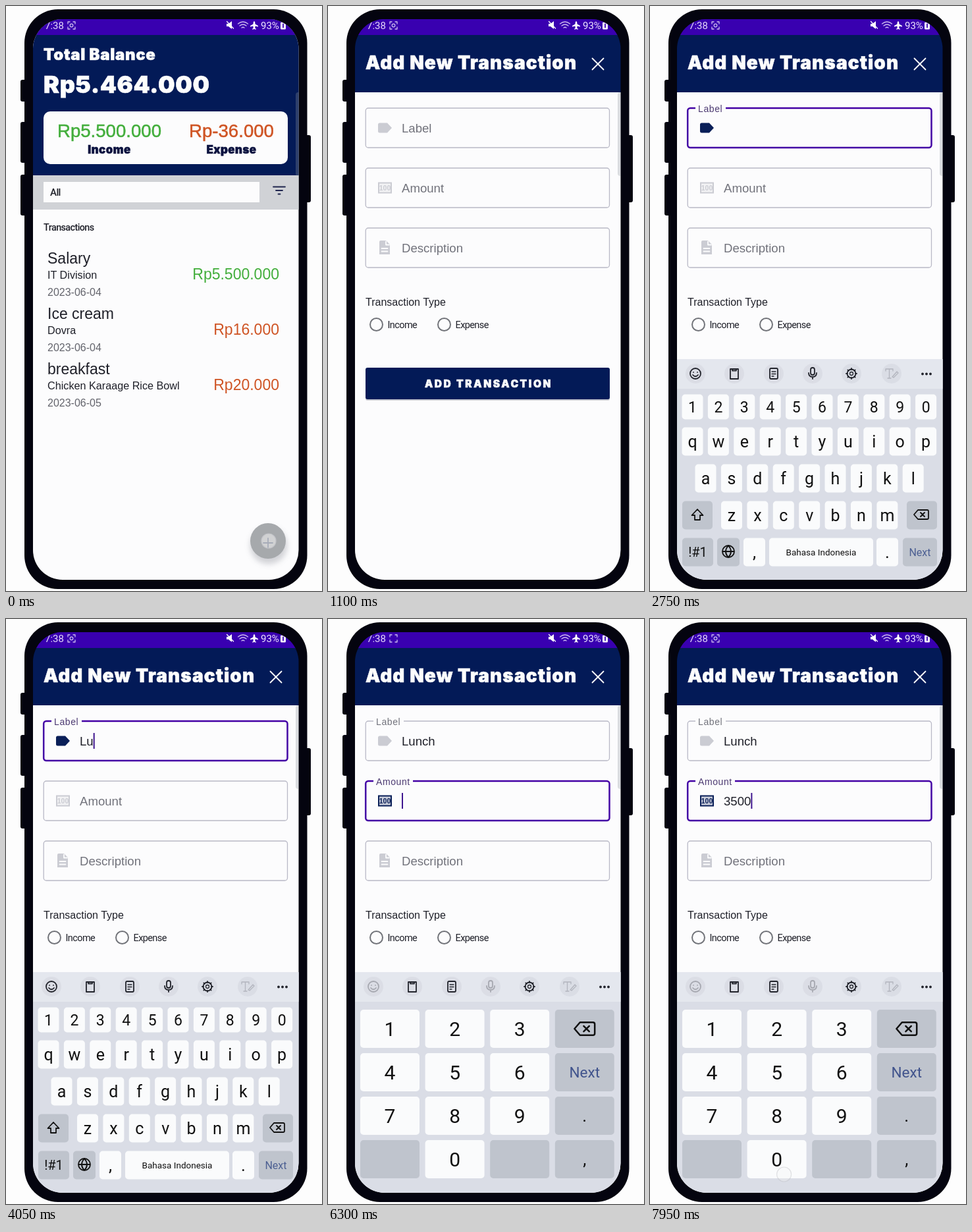
An HTML page that plays this animation: 480x888 px, repeating every 8000 ms.

```html
<!DOCTYPE html>
<html lang="en">
<head>
<meta charset="utf-8">
<title>Expense tracker</title>
<style>
html, body { margin: 0; width: 100%; height: 100%; overflow: hidden; background: #fdfdfd; }
svg { display: block; width: 100%; height: 100%; }
text { font-family: "Liberation Sans", Arial, sans-serif; white-space: pre; }
.heavy { font-family: Inter, sans-serif; font-weight: 900; stroke: currentColor; stroke-width: .6px; letter-spacing: .03em; }
.slim { font-family: Roboto, sans-serif; letter-spacing: -.6px; }
.key { font-family: Roboto, sans-serif; text-anchor: middle; }
.end { text-anchor: end; }
.mid { text-anchor: middle; }
.line { fill: none; stroke: currentColor; stroke-width: 1.8; stroke-linecap: round; stroke-linejoin: round; }
.thin { stroke-width: 1.3; }
</style>
</head>
<body>
<svg id="stage" viewBox="0 0 480 888" xmlns="http://www.w3.org/2000/svg"></svg>
<script>
const LOOP = 8000;
const PAGE = '#fcfcfd', NAVY = '#031a57', PURPLE = '#3900b0', INK = '#1f2029', BODY = '#04040f';
const EDGE = '#b9b9c6', PALE = '#cbccd3', DIM = '#71727b', WHITE = '#fdfdfd';
const GREEN = '#43ae3c', RED = '#cf5424', KEY = '#fafbfc', MOD = '#bfc4cd', BOARD = '#dadde6';

const rect = (x, y, w, h, fill, r = 0, more = '') =>
  `<rect x="${x}" y="${y}" width="${w}" height="${h}" rx="${r}" fill="${fill}" ${more}/>`;
const text = (x, y, s, size, fill, cls = '', more = '') =>
  `<text x="${x}" y="${y}" font-size="${size}" fill="${fill}" color="${fill}" class="${cls}" ${more}>${s}</text>`;
const line = (d, color, more = '') => `<path class="line" d="${d}" style="color:${color}" ${more}/>`;
const thin = (d, color) => `<path class="line thin" d="${d}" style="color:${color}"/>`;
const group = (id, body, more = '') => `<g id="${id}" ${more}>${body}</g>`;

function phone() {
  const buttons = [[22, 112, 33], [22, 176, 62], [22, 256, 62], [452, 196, 102]];
  return buttons.map(([x, y, h]) => rect(x, y, 11, h, BODY, 3)).join('') +
    rect(28, 5, 429.5, 880, BODY, 51);
}

function statusBar() {
  const soft = '#cdbdf0';
  return rect(41, 20, 404, 24, PURPLE) +
    text(59, 35, '7:38', 15, '#e6dcfa', 'key', 'style="text-anchor:start"') +
    thin('M94 27v-3h3M102 24h3v3M105 32v3h-3M97 35h-3v-3', soft) +
    `<circle id="rec" cx="99.5" cy="29.5" r="2.3" fill="none" stroke="${soft}" stroke-width="1.2"/>` +
    `<path d="M335 27h3l5-4v12l-5-4h-3z" fill="${WHITE}"/>` + thin('M335.500 23.500l10 10.500', WHITE) +
    thin('M352.500 27q7.500-6 15 0M355 30q5-4 10 0M358 33q2-1.500 4 0', soft) +
    `<path d="M376 23.500h2l.6 4 4.400 2.600v1.500l-4.400-1.200-.3 3 1.500 1.300v1l-2.800-.7-2.800.7v-1l1.500-1.300-.3-3-4.400 1.200v-1.500l4.400-2.600z" fill="${WHITE}"/>` +
    text(387, 35, '93%', 15, '#efe8ff', 'key', 'style="text-anchor:start"') +
    rect(417, 24.5, 8, 11, WHITE, 1.5) + line('M421 27.500v5', PURPLE);
}

function entry(y, title, note, date, sum, color) {
  return text(63, y, title, 23, INK) + text(63, y + 23, note, 16.2, INK) +
    text(63, y + 49, date, 16, '#63646c') + text(415, y + 24, sum, 23, color, 'end');
}

function listPage() {
  const bold = c => `stroke="${c}" stroke-width=".5"`;
  return rect(41, 20, 404, 870, PAGE) + rect(41, 20, 404, 237, NAVY) +
    text(57, 82, 'Total Balance', 23.9, WHITE, 'heavy') +
    text(57, 132, 'Rp5.464.000', 36, WHITE, 'heavy', 'style="letter-spacing:.6px"') +
    rect(57, 160, 371, 80, PAGE, 10) +
    text(157, 199, 'Rp5.500.000', 27.6, GREEN, 'mid', bold(GREEN)) +
    text(342.5, 199, 'Rp-36.000', 27.6, RED, 'mid', bold(RED)) +
    text(157, 224, 'Income', 16.8, '#0c1340', 'heavy mid') +
    text(342.5, 224, 'Expense', 16.8, '#0c1340', 'heavy mid') +
    rect(41, 257, 404, 52, '#d0d2d6') + rect(57, 267, 328, 31, PAGE) +
    text(67, 288, 'All', 15, INK, 'slim', 'font-weight="500"') +
    line('M406 274.500h18M410 280h10M413.500 285.500h3', '#20264f') +
    text(57, 341, 'Transactions', 14.4, INK, 'slim', 'font-weight="500"') +
    entry(391, 'Salary', 'IT Division', '2023-06-04', 'Rp5.500.000', GREEN) +
    entry(475, 'Ice cream', 'Dovra', '2023-06-04', 'Rp16.000', RED) +
    entry(559, 'breakfast', 'Chicken Karaage Rice Bowl', '2023-06-05', 'Rp20.000', RED) +
    `<circle cx="399" cy="819" r="28" fill="#90929c" opacity=".4" filter="url(#soft)"/>` +
    `<circle id="fab" cx="398" cy="812" r="27"/>` + line('M391 815h14M398 808v14', '#4a5570');
}

const icons = {
  label: `<path d="M78.500 177.500H90l7 7.500-7 7.500H78.500q-2.500 0-2.500-2.500v-10q0-2.500 2.500-2.500z" fill="currentColor"/>`,
  amount: `<rect x="77" y="268.500" width="19" height="15" fill="currentColor" fill-opacity=".22" stroke="currentColor" stroke-width="2"/>` +
    text(86.5, 279.8, '100', 10.5, 'currentColor', 'mid', 'font-weight="700" style="color:inherit"'),
  about: `<path d="M80 356h8l6 6v15H78v-19q0-2 2-2z" fill="currentColor"/>` +
    line('M81.500 368h9M81.500 372.500h9M88 357.500v5h5', PAGE)
};

function field(id, y, name, gap) {
  return rect(57.2, y, 370.3, 60, 'none', 4, `id="${id}Box"`) +
    rect(69, y - 3, gap, 6, PAGE, 0, `id="${id}Gap"`) +
    group(id + 'Icon', icons[id]) + text(112, y + 36.5, name, 18.6, DIM, '', `id="${id}Name"`) +
    text(112, y + 37, '', 18.6, INK, '', `id="${id}Value"`);
}

function radio(x, name) {
  return `<circle cx="${x}" cy="483.500" r="9.500" fill="none" stroke="#72747a" stroke-width="2"/>` +
    text(x + 17, 489, name, 14.5, INK, 'slim');
}

function formPage() {
  return rect(41, -400, 404, 445, PURPLE) + rect(41, 44, 404, 87, NAVY) +
    rect(41, 131, 404, 760, PAGE) +
    text(57, 96, 'Add New Transaction', 28, WHITE, 'heavy', 'style="letter-spacing:1.1px"') +
    line('M401.500 79.500l17 17M418.500 79.500l-17 17', WHITE, 'stroke-width="2.600"') +
    field('label', 155, 'Label', 46) + field('amount', 246, 'Amount', 60) +
    field('about', 337, 'Description', 0) +
    rect(112, 173, 2, 24, '#3f168f', 0, 'id="caret"') +
    text(57, 454.5, 'Transaction Type', 16, INK) + radio(73.5, 'Income') + radio(176.5, 'Expense') +
    rect(57, 551, 371, 48, '#a9abb6', 3, 'opacity=".6"') + rect(57, 549, 371, 48, NAVY, 3) +
    text(244, 579, 'ADD TRANSACTION', 15.5, WHITE, 'heavy mid', 'style="letter-spacing:2.6px"');
}

function toolbar() {
  const ink = '#22242c';
  const pads = [69, 128, 188, 247, 306, 367].map(x =>
    `<circle cx="${x}" cy="558" r="15" fill="#d3d6df" opacity=".55"/>`).join('');
  const gear = Array.from({ length: 8 }, (_, i) =>
    `<path class="line" d="M306 552v-2" transform="rotate(${i * 45} 306 558)"/>`).join('');
  return pads +
    group('smile', `<circle class="line" cx="69" cy="558" r="8"/>` +
      line('M66 556v.1M72 556v.1M65 560q4 4.500 8 0', 'inherit'), `color="${ink}"`) +
    line('M122 551h12v15h-12zM125 551v2.500h6V551', ink) +
    line('M182 552q0-2 2-2h8q2 0 2 2v12q0 2-2 2h-8q-2 0-2-2z', ink) +
    thin('M185 555h6M185 558.500h6M185 562h3', ink) +
    group('mic', rect(244, 549, 6, 11, 'none', 3, 'class="line"') +
      line('M241 557q0 6 6 6t6-6M247 563v3', 'inherit'), `color="${ink}"`) +
    `<g color="${ink}"><circle class="line" cx="306" cy="558" r="6.500"/><circle class="line thin" cx="306" cy="558" r="2.500"/>${gear}</g>` +
    thin('M358 554v-3h11v3M363.500 551v14M361 565h5M368 563l7-8 2 2-7 7z', '#b2b5be') +
    [414, 420, 426].map(x => `<circle cx="${x}" cy="558.500" r="1.900" fill="${ink}"/>`).join('');
}

const STEP = 39.4;
const cap = (x, y, w, h, s, size, fill = KEY, ink = '#111', cls = '') =>
  rect(x - w / 2, y - h / 2, w, h, fill, 5) +
  text(x, y + size * .35, s, size, ink, 'key ' + cls);
const keyRow = (s, x, y, h, size) => [...s].map((c, i) =>
  cap(x + i * STEP, y, 32, h, c, size, KEY, '#111', h > 40 ? 'ch' : '')).join('');
const erase = (x, y, k) => line('M-11 0l6-7H9q2 0 2 2V5q0 2-2 2H-5zM-1-3l6 6M5-3l-6 6', '#111',
  `transform="translate(${x} ${y}) scale(${k})"`);

function letters() {
  return keyRow('1234567890', 64.5, 608.5, 38, 23) + keyRow('qwertyuiop', 64.5, 661, 43, 25) +
    keyRow('asdfghjkl', 84.5, 717, 43, 25) + keyRow('zxcvbnm', 124, 773, 43, 25) +
    cap(72, 773, 46, 43, '', 20, MOD) + line('M72 764l8.500 9H76v7h-8v-7h-4.500z', '#111') +
    cap(413, 773, 46, 43, '', 20, MOD) + erase(412, 772, 1) +
    cap(72.5, 829, 47, 43, '!#1', 20, MOD) + cap(119, 829, 34, 43, '', 20, MOD) +
    line('M110 828a9 9 0 1 0 18 0a9 9 0 1 0-18 0zM110 828h18M119 819q-8 9 0 18M119 819q8 9 0 18', '#111') +
    cap(158.5, 829, 33, 43, ',', 26) + cap(260, 829, 158, 43, 'Bahasa Indonesia', 13.5) +
    cap(360.5, 829, 33, 43, '.', 26) + cap(410, 829, 52, 43, 'Next', 16, MOD, '#4c5f92');
}

const padX = c => 94 + c * 98.6, padY = r => 622 + r * 66;
function numpad() {
  const faces = ['123<', '456N', '789.', ' 0 ,'];
  return faces.map((row, r) => [...row].map((c, i) => {
    const digit = c >= '0' && c <= '9', x = padX(i), y = padY(r);
    if (c === '<') return cap(x, y, 90, 58, '', 30, MOD) + erase(x, y, 1.4);
    if (c === 'N') return cap(x, y, 90, 58, 'Next', 22.5, MOD, '#40538c');
    return cap(x, y, 90, 58, c, digit ? 30 : 26, digit ? KEY : MOD);
  }).join('')).join('');
}

const stage = document.getElementById('stage');
stage.innerHTML = `<defs><clipPath id="glass">${rect(41, 20, 403.5, 851, '#000', 45)}</clipPath>
  <filter id="soft" x="-40%" y="-40%" width="180%" height="180%"><feGaussianBlur stdDeviation="4"/></filter></defs>` +
  rect(0, 0, 480, 888, '#fdfdfd') + phone() +
  `<g clip-path="url(#glass)">` +
  group('list', listPage()) + group('form', formPage()) +
  group('board', rect(41, 536, 404, 340, BOARD) + rect(41, 536, 404, 45, '#e4e7ee') + toolbar() +
    group('letters', letters()) + group('numpad', numpad()) +
    rect(0, 0, 0, 0, '#1a2c48', 5, 'id="hit" opacity=".38"')) +
  statusBar() + rect(440, 131, 10, 127, '#8e959c', 4, 'opacity=".300"') +
  `<circle id="touch" r="11" fill="#f4f4f4" fill-opacity=".55" stroke="#c4c5ca" stroke-width="1.200"/></g>`;

const el = {};
stage.querySelectorAll('[id]').forEach(n => el[n.id] = n);
const chars = [...stage.querySelectorAll('.ch')];
const set = (id, attrs) => { for (const k in attrs) el[id].setAttribute(k, attrs[k]); };
const show = (id, on) => set(id, { visibility: on ? 'visible' : 'hidden' });
const clamp = v => Math.min(1, Math.max(0, v));
const ease = (t, start, span) => 1 - (1 - clamp((t - start) / span)) ** 3;
const mix = (a, b, p) => a + (b - a) * p;

const FOCUS = 1755, NEXT = 6050, SWAP = 6230;
// x, y, finger down, finger up, key width, key height, typed character
const taps = [
  [398, 812, -200, 150],
  [357, 188, 1680, 1780],
  [72, 773, 2920, 2990, 46, 43],
  [399.7, 717, 3370, 3450, 32, 43, 'L'],
  [301, 661, 3790, 3870, 32, 43, 'u'],
  [321, 773, 4210, 4290, 32, 43, 'n'],
  [203, 773, 4620, 4700, 32, 43, 'c'],
  [281.5, 717, 4970, 5050, 32, 43, 'h'],
  [300, 278, 5980, 6060],
  [padX(2), padY(0), 6770, 6850, 90, 58, '3'],
  [padX(1), padY(1), 7150, 7240, 90, 58, '5'],
  [padX(1), padY(3), 7510, 7590, 90, 58, '0'],
  [padX(1), padY(3), 7820, 7890, 90, 58, '0']
];

function drawField(id, y, gap, lift, focused) {
  set(id + 'Box', { stroke: focused ? '#4300a5' : EDGE, 'stroke-width': focused ? 2.5 : 1.3 });
  set(id + 'Gap', { x: 69 + gap / 2 * (1 - lift), width: gap * lift });
  set(id + 'Name', {
    x: mix(112, 73, lift), y: mix(y + 36.5, y + 6, lift), 'font-size': mix(18.6, 14, lift),
    'letter-spacing': .6 * lift, fill: focused ? '#4c3a72' : DIM
  });
  set(id + 'Icon', { color: focused ? '#0a1f58' : PALE });
}

let upper = null;
function render(t) {
  const enter = ease(t, 620, 400);
  set('list', { transform: `translate(0 ${-10 * enter})` });
  show('list', t < 1020);
  set('form', { transform: `translate(0 ${406 * (1 - enter)})`, opacity: clamp((t - 620) / 170) });
  set('fab', { fill: t < 150 ? '#a6a9ac' : t < 400 ? '#bdbfc4' : '#dadbe0' });

  const typed = taps.filter(k => k[6] && k[3] <= t);
  const word = late => typed.filter(k => (k[3] > NEXT) === late).map(k => k[6]).join('');
  const onAmount = t >= NEXT;
  drawField('label', 155, 46, ease(t, FOCUS, 167), t >= FOCUS && !onAmount);
  drawField('amount', 246, 60, ease(t, NEXT, 167), onAmount);
  drawField('about', 337, 0, 0, false);
  el.labelValue.textContent = word(false);
  el.amountValue.textContent = word(true);

  const value = onAmount ? el.amountValue : el.labelValue;
  const last = Math.max(onAmount ? NEXT : FOCUS, ...typed.map(k => k[3]));
  set('caret', { x: 112 + (value.textContent ? value.getComputedTextLength() : 0), y: onAmount ? 264 : 173 });
  show('caret', t >= FOCUS && (t - last) % 1000 < 500);

  set('board', { transform: `translate(0 ${340 * (1 - ease(t, 2020, 320))})` });
  show('letters', t < SWAP);
  show('numpad', t >= SWAP);
  const faded = t >= SWAP ? .28 : 1;
  set('smile', { opacity: faded });
  set('mic', { opacity: faded });
  const shift = t >= 2990 && t < 3450;
  if (shift !== upper) {
    upper = shift;
    chars.forEach(c => c.textContent = shift ? c.textContent.toUpperCase() : c.textContent.toLowerCase());
  }

  const tap = taps.find(k => t >= k[2] && t < k[3] + 120);
  show('touch', !!tap);
  show('hit', !!tap && !!tap[4] && t < tap[3]);
  if (tap) {
    const [x, y, , up, w = 0, h = 0] = tap;
    set('touch', { cx: x + (w ? 11 : 1), cy: y + (w > 50 ? 23 : w ? 10 : 0), opacity: 1 - clamp((t - up) / 120) });
    set('hit', { x: x - w / 2, y: y - h / 2, width: w, height: h });
  }
  show('rec', Math.cos(t / LOOP * 12 * Math.PI) > 0);
}

const start = performance.now();
(function tick() {
  render((performance.now() - start) % LOOP);
  requestAnimationFrame(tick);
})();
</script>
</body>
</html>
```
